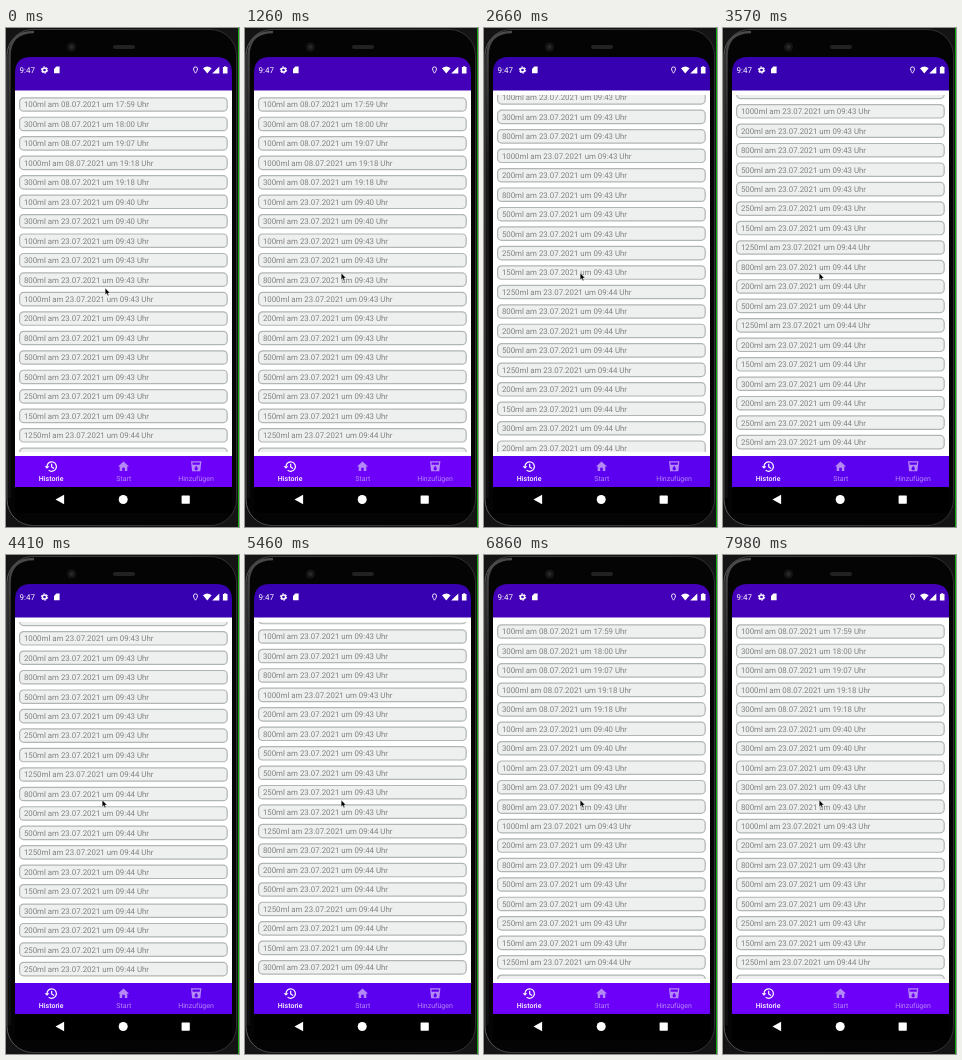
Animation of 233x499 px, one loop 8 s. Source, as an HTML page:

```html
<!DOCTYPE html>
<html lang="de">
<head>
<meta charset="utf-8">
<title>Historie</title>
<style>
  html, body { margin: 0; width: 100%; height: 100%; overflow: hidden; background: #141414; }
  svg { display: block; width: 100vw; height: 100vh; }
  text { font-family: Roboto, "Noto Sans", sans-serif; text-rendering: geometricPrecision; }
  #rows text { font-size: 7.85px; fill: #808181; }
  #rows rect { fill: #eeefef; stroke: #b0b6b4; stroke-width: 1.2; }
  .tab { font-size: 7px; text-anchor: middle; }
</style>
</head>
<body>
<svg viewBox="0 0 233 499">
  <defs>
    <clipPath id="view"><rect x="9" y="67" width="217" height="357"/></clipPath>
    <linearGradient id="rim">
      <stop offset="0" stop-color="#5c5c5c"/>
      <stop offset=".12" stop-color="#3c3c3c"/>
      <stop offset="1" stop-color="#303030"/>
    </linearGradient>
    <linearGradient id="shine" x2="0" y2="1">
      <stop offset="0" stop-color="#4a4a4a"/>
      <stop offset=".3" stop-color="#1c1c1c"/>
      <stop offset="1" stop-color="#101010"/>
    </linearGradient>
  </defs>

  <!-- phone body -->
  <rect width="233" height="499" fill="#141414"/>
  <rect x="232" width="1" height="499" fill="#0aa50a"/>
  <rect x="1" y="1.5" width="229.5" height="496" rx="26" fill="#040404" stroke="url(#rim)"/>
  <path d="M3.5 470V28Q3.5 4 28 4" fill="none" stroke="url(#shine)" stroke-width="2.5"/>
  <circle cx="65.5" cy="19" r="4.5" fill="#151516"/>
  <circle cx="65.5" cy="19" r="2" fill="#29292d"/>
  <rect x="107" y="17" width="22" height="4" rx="2" fill="#222"/>

  <!-- status bar -->
  <path id="head" d="M9 63V45Q9 29 25 29H210Q226 29 226 45V63Z"/>
  <g fill="#fff">
    <text x="13.6" y="45" font-size="8">9:47</text>
    <circle cx="38.5" cy="42" r="2.1" fill="none" stroke="#fff" stroke-width="1.5"/>
    <circle cx="38.5" cy="42" r="3.2" fill="none" stroke="#fff" stroke-dasharray="1.7 1.651"/>
    <path d="M50.3 38.6H53.6V45.2H48V40.9Z"/>
    <path d="M189.5 38.9a2 2 0 0 0-2 2c0 1.6 2 4.3 2 4.3s2-2.7 2-4.3a2 2 0 0 0-2-2Z" fill="none" stroke="#fff" stroke-width=".9"/>
    <path d="M197 40.2Q201.3 36.6 205.6 40.2L201.3 45.6Z"/>
    <path d="M213.3 38.4V45.6H206.2Z"/>
    <path d="M218.2 38.2h2v.8h1.3v6.6h-4.6v-6.6h1.3Z"/>
  </g>

  <!-- list -->
  <rect x="9" y="62.5" width="217" height="366" fill="#fff"/>
  <g clip-path="url(#view)"><g id="rows"></g></g>

  <!-- tabs -->
  <rect id="bar" x="9" y="428" width="217" height="31"/>
  <g fill="none" stroke="#fff" stroke-width="1.2">
    <path d="M41 438.5a4.7 4.7 0 1 1 1.6 3.6"/>
    <path d="M45.7 435.8V439l2.4 1.5"/>
  </g>
  <path d="M38.6 438.2h4.8L41 440.8Z" fill="#fff"/>
  <text class="tab" x="45.1" y="453" fill="#fff" font-weight="500">Historie</text>
  <g fill="#b488f6">
    <path d="M117.5 433.5L123 438.6H121.3V443H118.8V439.8H116.2V443H113.7V438.6H112Z"/>
    <text class="tab" x="117.8" y="453">Start</text>
    <path d="M185 433.3H195.4L194.3 443.3H186.1ZM186.4 434.5L186.7 436.7H193.7L194 434.5ZM190.2 437.8Q188.5 440 188.5 440.7a1.7 1.7 0 0 0 3.4 0Q191.9 440 190.2 437.8Z" fill-rule="evenodd"/>
    <text class="tab" x="190" y="453">Hinzufügen</text>
  </g>

  <!-- system buttons -->
  <rect x="9" y="459" width="217" height="26" fill="#000"/>
  <g fill="#fff">
    <path d="M49.5 471.5L58.1 466.7V476.3Z"/>
    <circle cx="117.2" cy="471.5" r="4.5"/>
    <rect x="175.6" y="467.5" width="8.2" height="8.2" rx=".6"/>
  </g>

  <path id="mouse" d="M0 0V6.8L1.5 5.4L2.6 7.8L3.7 7.3L2.7 5L4.8 4.9Z" fill="#000" stroke="#fff" stroke-width=".4"/>
</svg>
<script>
const LOOP = 8000, STEP = 70, PITCH = 19.46;
const $ = id => document.getElementById(id);

// Amounts grouped by date and time.
const log = [
  ['08.07.2021', '17:59', [100]],
  ['08.07.2021', '18:00', [300]],
  ['08.07.2021', '19:07', [100]],
  ['08.07.2021', '19:18', [1000, 300]],
  ['23.07.2021', '09:40', [100, 300]],
  ['23.07.2021', '09:43', [100, 300, 800, 1000, 200, 800, 500, 500, 250, 150]],
  ['23.07.2021', '09:44', [1250, 800, 200, 500, 1250, 200, 150, 300, 200, 250, 250]]
];
$('rows').innerHTML = log
  .flatMap(([day, time, list]) => list.map(ml => `${ml}ml am ${day} um ${time} Uhr`))
  .map((label, i) => `<g transform="translate(0 ${(69.8 + i * PITCH).toFixed(2)})">
    <rect x="13.6" width="207.6" height="13.4" rx="4"/>
    <text x="17.9" y="9.6">${label}</text></g>`)
  .join('');

// Keys are [time, value], linear in between.
const scrollKeys = [[0, 0], [2030, 0], [2170, 31], [2660, 143.3], [2870, 187.8],
  [4900, 187.8], [5460, 131.2], [6160, 48], [6580, 0], [LOOP, 0]];
const mouseKeys = [[0, 0], [700, 0], [1200, 1], [LOOP, 1]];

function at(keys, t) {
  const i = keys.findIndex(k => k[0] > t);
  const [t0, a] = keys[i - 1], [t1, b] = keys[i];
  return a + (b - a) * (t - t0) / (t1 - t0);
}

function draw(ms) {
  const t = Math.floor(ms % LOOP / STEP) * STEP;
  const y = at(scrollKeys, t), m = at(mouseKeys, t);
  const top = y < 20;
  $('rows').setAttribute('transform', `translate(0 ${-y})`);
  $('mouse').setAttribute('transform', `translate(${99.2 - 3 * m} ${260 - 15 * m})`);
  $('head').setAttribute('fill', top ? '#4400b8' : '#3700b0');
  $('bar').setAttribute('fill', top ? '#6c00f8' : '#5c00f0');
}

const start = performance.now();
function tick() {
  draw(performance.now() - start);
  requestAnimationFrame(tick);
}
tick();
</script>
</body>
</html>
```
